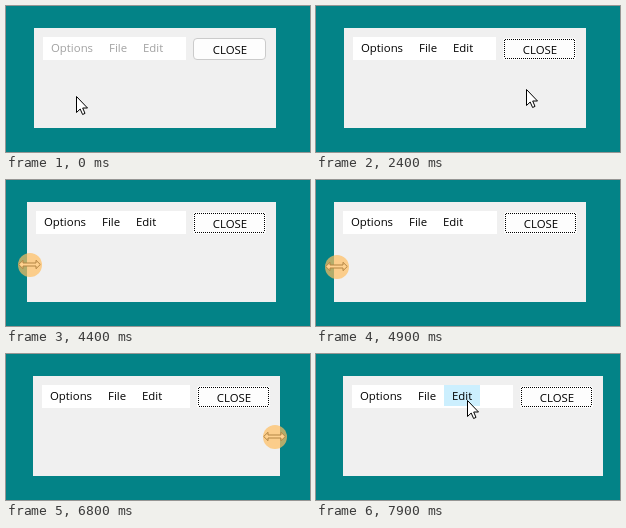
An HTML page that plays this animation: 304x146 px, repeating every 8000 ms.

```html
<!DOCTYPE html>
<html lang="en">
<head>
<meta charset="utf-8">
<title>Resizable window</title>
<style>
  html, body { margin: 0; width: 100%; height: 100%; overflow: hidden; background: #038387; }
  svg { display: block; width: 304px; height: 146px; }
  text { font: 11.4px "Open Sans", "Noto Sans", sans-serif; }
  .pointer { fill: #fff; stroke: #000; }
</style>
</head>
<body>
<svg viewBox="0 0 304 146">
  <rect width="304" height="146" fill="#038387"/>
  <rect id="pane" y="22" height="100" fill="#f0f0f0"/>
  <rect id="bar" y="31" height="23" fill="#fff"/>
  <g id="menu">
    <rect id="hover" x="101" y="31" width="36" height="21" fill="#cceffe"/>
    <text x="17" y="46">Options</text>
    <text x="75" y="46">File</text>
    <text x="109" y="46">Edit</text>
  </g>
  <g id="button">
    <rect id="plain" x="-82.5" y="32.5" width="72" height="21" rx="3.5" fill="#fdfdfd" stroke="#cbcbcb"/>
    <g id="focused">
      <rect x="-83" y="32" width="73" height="22" rx="3" fill="#fdfdfd"/>
      <path d="M-81 33.5H-12M-81 52.5H-12M-81.5 34V52M-11.5 34V52" stroke="#000" stroke-dasharray="1 1"/>
    </g>
    <text x="-46" y="47.5" text-anchor="middle">CLOSE</text>
  </g>
  <path id="arrow" class="pointer" d="M.5 .5V16.5L4.2 13L6.6 18.5L9 17.4L6.7 12H11.5Z"/>
  <path id="resize" class="pointer" d="M-10.8 0L-6.5-4.2V-1.5H6.5V-4.2L10.8 0L6.5 4.2V1.5H-6.5V4.2Z"/>
  <circle id="press" r="12" fill="#ffbe5f" opacity=".7"/>
</svg>
<script>
const LOOP = 8000, STEP = 100;

const linear = k => k;
const easeOut = k => 1 - (1 - k) ** 2;

// Pointer moves; it rests between them.
const home = [70, 90];
const moves = [
  { from: 0, to: 100, end: [49, 86], ease: linear },
  { from: 500, to: 1000, end: [115, 98], ease: easeOut },
  { from: 1500, to: 2400, end: [210, 83], ease: easeOut },
  { from: 2400, to: 3700, end: [30, 84], ease: easeOut },
  { from: 4100, to: 4700, end: [17, 86], ease: linear },
  { from: 4800, to: 5100, end: [30, 88], ease: linear },
  { from: 5200, to: 5700, end: [230, 89], ease: easeOut },
  { from: 5700, to: 6400, end: [265, 83], ease: easeOut },
  { from: 6700, to: 7100, end: [282, 82], ease: linear },
  { from: 7200, to: 7900, end: [151, 46], ease: easeOut }
];

const el = id => document.getElementById(id);
const set = (id, attrs) => {
  for (const name in attrs) el(id).setAttribute(name, attrs[name]);
};
const show = (id, on) => { el(id).style.display = on ? "" : "none"; };
const within = (t, from, to) => t >= from && t < to;

function pointerAt(t) {
  let point = home;
  for (const { from, to, end, ease } of moves) {
    if (t < from) break;
    const k = ease(Math.min(1, (t - from) / (to - from)));
    point = point.map((v, i) => v + (end[i] - v) * k);
  }
  return point.map(Math.round);
}

function render(t) {
  const [x, y] = pointerAt(t);
  const dragLeft = within(t, 4100, 5200), dragRight = within(t, 6800, 7300);
  const left = t < 4100 ? 28 : dragLeft ? x - 3 : 27;
  const right = t < 6800 ? 270 : dragRight ? Math.min(287, x + 5) : 287;
  const inner = right + (within(t, 4900, 5100) ? 1 : 0); // contents lag behind the frame
  const active = t >= 1300;

  set("pane", { x: left, width: right - left });
  set("bar", { x: left + 9, width: inner - left - 99 });
  set("menu", { transform: `translate(${left})`, fill: active ? "#000" : "#a2a2a2" });
  set("button", { transform: `translate(${inner})` });
  show("plain", !active);
  show("focused", active);
  show("hover", y < 54 && within(x, left + 101, left + 137));

  const sizing = within(t, 3500, 5200) || within(t, 6200, 7300);
  show("arrow", !sizing && !within(t, 100, 500));
  show("resize", sizing);
  show("press", within(t, 1300, 1400) || within(t, 4100, 5100) || within(t, 6800, 7200));
  set("arrow", { transform: `translate(${x} ${y})` });
  set("resize", { transform: `translate(${x - .5} ${y - .5})` });
  set("press", { cx: x, cy: y });
}

const start = performance.now();
function tick() {
  const t = (performance.now() - start) % LOOP;
  render(Math.floor(t / STEP) * STEP);
  requestAnimationFrame(tick);
}
tick();
</script>
</body>
</html>
```
